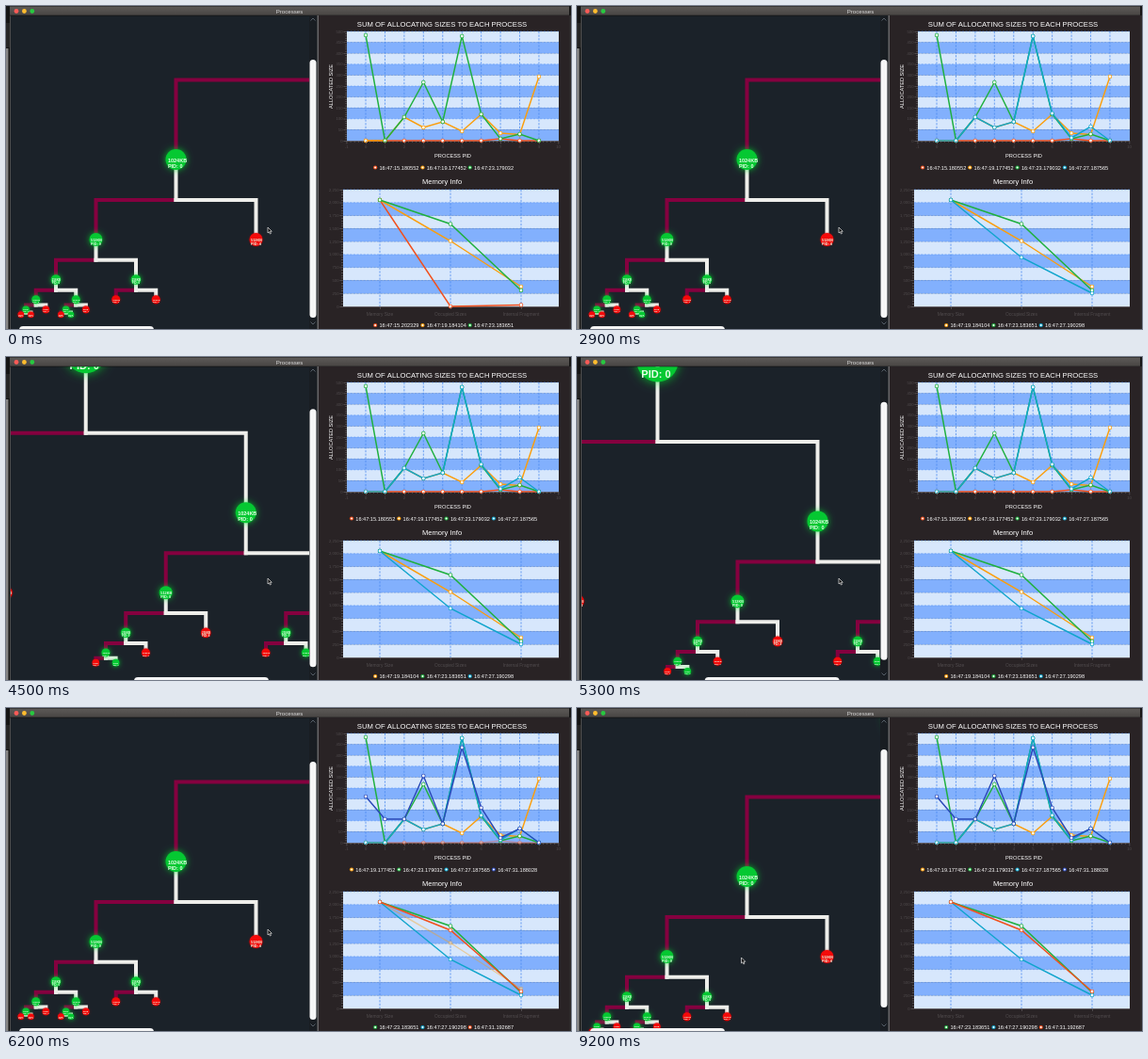
Recreate the animation shown at these times as an HTML page with a canvas. Size 600 by 343 pixels, loop 9.3 s.

```html
<!DOCTYPE html>
<html lang="en">
<head>
<meta charset="utf-8">
<title>Processes</title>
<style>
  html, body { margin: 0; width: 100%; height: 100%; overflow: hidden; background: #111; }
  canvas { display: block; }
</style>
</head>
<body>
<canvas id="stage" width="600" height="343"></canvas>
<script>
const ctx = document.getElementById('stage').getContext('2d');
const LOOP = 9300, GROW = 500, FADE = 900;
const FONT = '"Liberation Sans", Arial, sans-serif';
const RED = '#f2501d', ORANGE = '#fb9e0c', GREEN = '#1fb03f', TEAL = '#10a5cc', NAVY = '#2a48b8';
const UPDATE_1 = 1645, UPDATE_2 = 5645, REALLOC = 4400;

const clamp = v => Math.max(0, Math.min(1, v));

// Value at time t after a series of eased moves [start, end, value].
function track(t, value, moves) {
  for (const [start, end, next] of moves) {
    const p = clamp((t - start) / (end - start));
    value += (next - value) * p * p * (3 - 2 * p);
  }
  return value;
}

function rect(x, y, w, h, color) {
  ctx.fillStyle = color;
  ctx.fillRect(x, y, w, h);
}

function pill(x, y, w, h, color) {
  ctx.fillStyle = color;
  ctx.beginPath();
  ctx.roundRect(x, y, w, h, Math.min(w, h) / 2);
  ctx.fill();
}

function disc(x, y, r, color) {
  ctx.fillStyle = color;
  ctx.beginPath();
  ctx.arc(x, y, r, 0, 7);
  ctx.fill();
}

function path(points, color, width) {
  ctx.strokeStyle = color;
  ctx.lineWidth = width;
  ctx.beginPath();
  points.forEach(([x, y]) => ctx.lineTo(x, y));
  ctx.stroke();
}

function text(s, x, y, size, color = '#fff', align = 'center', weight = '') {
  ctx.font = `${weight} ${size}px ${FONT}`;
  ctx.textAlign = align;
  ctx.fillStyle = color;
  ctx.fillText(s, x, y);
}

// ---- process tree: preorder, G = split block, g = free leaf, r = used leaf ----
const LEFT = 'GGGGGrrrGGrgrGrrr';
const RADII = [22, 11, 7, 5.3, 4.5, 3.8, 3.3];

function parse(chars, depth, x, y) {
  const kind = chars.shift();
  const node = { depth, x, y, free: kind !== 'r', kids: [] };
  if (kind === 'G') {
    const step = 170 / 2 ** depth;
    node.kids = [-1, 1].map(side => parse(chars, depth + 1, x + side * step, y + step));
  }
  return node;
}

const treeBefore = parse([...'G' + LEFT + 'GGGGrgggGGrgr'], 0, 350.5, -7);
const treeAfter = parse([...'G' + LEFT + 'GGGGrgrrGGrgr'], 0, 350.5, -7);

function drawLinks({ x, y, kids }) {
  if (!kids.length) return;
  const [a, b] = kids, mid = (y + a.y) / 2 + 0.5;
  path([[x, mid], [a.x, mid], [a.x, a.y]], '#85003f', 4);
  path([[x, y], [x, mid + 2]], '#eeeeea', 4);
  path([[x - 2, mid], [b.x, mid], [b.x, b.y]], '#eeeeea', 4);
  kids.forEach(drawLinks);
}

function drawNodes({ depth, x, y, free, kids }) {
  const r = RADII[depth];
  ctx.save();
  ctx.shadowColor = free ? 'rgba(0, 230, 46, 0.75)' : 'rgba(190, 0, 0, 0.7)';
  ctx.shadowBlur = free ? 4 + r * 0.3 : 2;
  disc(x, y, r, free ? '#05c832' : '#f40a0a');
  ctx.restore();
  const size = r * (depth < 2 ? 0.5 : 0.55);
  text(2048 / 2 ** depth + 'KB', x - 0.78 * r, y + 0.25 * r, size, '#e8ffe8', 'left', 'bold');
  text('PID: ' + (free ? 0 : 4), x - 0.78 * r, y + 0.79 * r, size, '#e8ffe8', 'left', 'bold');
  kids.forEach(drawNodes);
}

function drawTree(t) {
  const sx = track(t, 0, [[3050, 3500, 268], [4300, 4600, 265], [5600, 6150, 0]]);
  const sy = track(t, 0, [[4300, 5000, 11.4], [5600, 6150, 0], [8300, 8700, 16]]);
  const tree = t < REALLOC ? treeBefore : treeAfter;
  ctx.save();
  ctx.beginPath();
  ctx.rect(5, 10.5, 317, 333);
  ctx.clip();
  rect(5, 10, 317, 333, '#1b2229');
  ctx.translate(-sx, sy);
  drawLinks(tree);
  drawNodes(tree);
  ctx.restore();

  pill(14 + 0.459 * sx, 340, 143, 8, '#f4f4f4');
  rect(322, 10, 8.5, 333, '#191d22');
  rect(330.5, 10, 1.5, 333, '#68686a');
  pill(322.5, 57 - 0.82 * sy, 7, 274, '#f6f6f6');
  path([[323.5, 15.5], [326, 13], [328.5, 15.5]], '#66707a', 0.8);
  path([[323.5, 335.5], [326, 338], [328.5, 335.5]], '#66707a', 0.8);
}

// ---- charts ----
const series = (name, color, ys, born = -LOOP, dies = 2 * LOOP) => ({ name, color, ys, born, dies });

const sizes = {
  x0: 382, dx: 20.44, left: 362, top: 27, bottom: 143, rows: 10, step: 50, legendY: 171.5,
  series: [
    series('16:47:15.180552', RED, [143, 143, 143, 143, 143, 143, 143, 141, 143, 143], undefined, UPDATE_2),
    series('16:47:19.177452', ORANGE, [143, 143, 118, 129, 123, 133, 115, 135, 136.5, 75]),
    series('16:47:23.179032', GREEN, [31, 143, 118, 81, 123, 32, 115, 141, 136, 143]),
    series('16:47:27.187565', TEAL, [143, 143, 118, 129, 123, 32, 114, 140, 128, 143], UPDATE_1),
    series('16:47:31.188028', NAVY, [94, 118, 118, 72, 123, 42, 106, 138, 128, 143], UPDATE_2)
  ]
};
const memory = {
  x0: 397, dx: 75, left: 358, top: 195, bottom: 319, rows: 9, step: 250, legendY: 339,
  series: [
    series('16:47:15.202329', RED, [206, 319, 317.5], undefined, UPDATE_1),
    series('16:47:19.184104', ORANGE, [206, 249.5, 298], undefined, UPDATE_2),
    series('16:47:23.183651', GREEN, [206, 231.5, 302]),
    series('16:47:27.190298', TEAL, [206, 267, 305], UPDATE_1),
    series('16:47:31.192687', RED, [206, 236, 301], UPDATE_2)
  ]
};

function drawSeries(chart, { color, ys, born, dies }, t) {
  if (t < born || t > dies + FADE) return;
  const grow = clamp((t - born) / GROW);
  const points = ys.map((y, i) => [chart.x0 + i * chart.dx, chart.bottom + (y - chart.bottom) * grow]);
  ctx.globalAlpha = clamp((t - born) / 200) * (1 - clamp((t - dies) / FADE));
  path(points, color, 1.45);
  for (const [x, y] of points) {
    disc(x, y, 2.2, color);
    disc(x, y, 1.4, '#fff');
  }
  ctx.globalAlpha = 1;
}

function drawChart(chart, t) {
  const { x0, dx, left, top, bottom, rows, step, legendY } = chart;
  const rowHeight = (bottom - top) / rows, dim = '#514c4e', grid = '#4d8cf0';
  for (let i = 0; i < rows; i++) {
    rect(left, top + i * rowHeight, 587 - left, rowHeight + 0.2, i % 2 ? '#82b0fd' : '#d7e7fc');
  }
  for (let i = 0; i <= rows; i++) {
    const y = bottom - i * rowHeight;
    text((i * step).toLocaleString('en-US'), left - 4.5, y + 1.5, 4.2, dim, 'right');
    for (let k = 0; k < (i < rows ? 5 : 1); k++) {
      rect(left - (k ? 2 : 3.5), y - k * rowHeight / 5, k ? 2 : 3.5, 0.5, '#777274');
    }
  }
  ctx.setLineDash([2.2, 1.4]);
  for (let i = 0; i < chart.series[0].ys.length; i++) {
    path([[x0 + i * dx, top], [x0 + i * dx, bottom]], grid, 0.8);
  }
  for (let i = 0; i < rows; i++) {
    path([[left, top + i * rowHeight], [587, top + i * rowHeight]], grid, 0.5);
  }
  ctx.setLineDash([]);
  rect(left, bottom, 587 - left, 0.6, '#777274');

  chart.series.forEach(s => drawSeries(chart, s, t));

  const items = chart.series.filter(s => t >= s.born && t < s.dies);
  items.forEach(({ name, color }, i) => {
    const x = 367 + (4 - items.length) * 25.15 + i * 50.3;
    disc(x, legendY, 2.1, color);
    disc(x, legendY, 1, '#fff');
    text(name, x + 4.3, legendY + 2, 5.6, '#fff', 'left');
  });
}

function drawCharts(t) {
  rect(332, 10, 266, 333, '#292325');
  text('SUM OF ALLOCATING SIZES TO EACH PROCESS', 463, 21.6, 7.7);
  drawChart(sizes, t);
  for (let i = 0; i <= 55; i++) rect(361.7 + i * 4.09, 143, 0.5, i % 5 ? 2 : 3.5, '#777274');
  for (let i = 0; i <= 11; i++) text(i - 1, 361.7 + i * 20.44, 151, 4.2, '#514c4e');
  text('PROCESS PID', 474.5, 160.7, 5.7);
  ctx.save();
  ctx.translate(346.6, 85.5);
  ctx.rotate(-Math.PI / 2);
  text('ALLOCATED SIZE', 0, 0, 5.6);
  ctx.restore();

  text('Memory Info', 463, 189, 7.6);
  drawChart(memory, t);
  ['Memory Size', 'Occupied Sizes', 'Internal Fragment'].forEach((label, i) => {
    rect(397 + i * 75, 319, 0.5, 3, '#777274');
    text(label, 397 + i * 75, 328.5, 4.9, '#514c4e');
  });
}

function drawWindow() {
  rect(0, 0, 600, 343, '#151515');
  rect(598, 10, 2, 333, '#2c2929');
  rect(0, 18, 4, 26, '#262626');
  rect(0, 45, 2.5, 298, '#868686');
  rect(4, 10, 1, 333, '#4c4c4c');
  const bar = ctx.createLinearGradient(0, 0, 0, 10);
  bar.addColorStop(0, '#5e5b59');
  bar.addColorStop(1, '#484543');
  rect(4, 0.5, 594, 9.5, bar);
  rect(4, 9.7, 594, 0.8, '#171717');
  ['#fc5b57', '#fdbc2e', '#28c840'].forEach((color, i) => disc(11 + i * 8.4, 5.5, 2.4, color));
  text('Processes', 301, 7.8, 6.1, '#dcdcdc');
}

function drawCursor(t) {
  ctx.save();
  ctx.translate(track(t, 278, [[6800, 7300, 174.5]]), track(t, 235, [[6800, 7300, 265]]));
  ctx.beginPath();
  [[0, 0], [0, 6], [1.4, 4.8], [2.4, 7], [3.4, 6.5], [2.5, 4.4], [4.3, 4.3]].forEach(([x, y]) => ctx.lineTo(x, y));
  ctx.closePath();
  ctx.fillStyle = '#111';
  ctx.strokeStyle = '#e8e8e8';
  ctx.lineWidth = 0.7;
  ctx.fill();
  ctx.stroke();
  ctx.restore();
}

function frame() {
  const t = performance.now() % LOOP;
  drawWindow();
  drawTree(t);
  drawCharts(t);
  drawCursor(t);
  requestAnimationFrame(frame);
}
frame();
</script>
</body>
</html>
```
